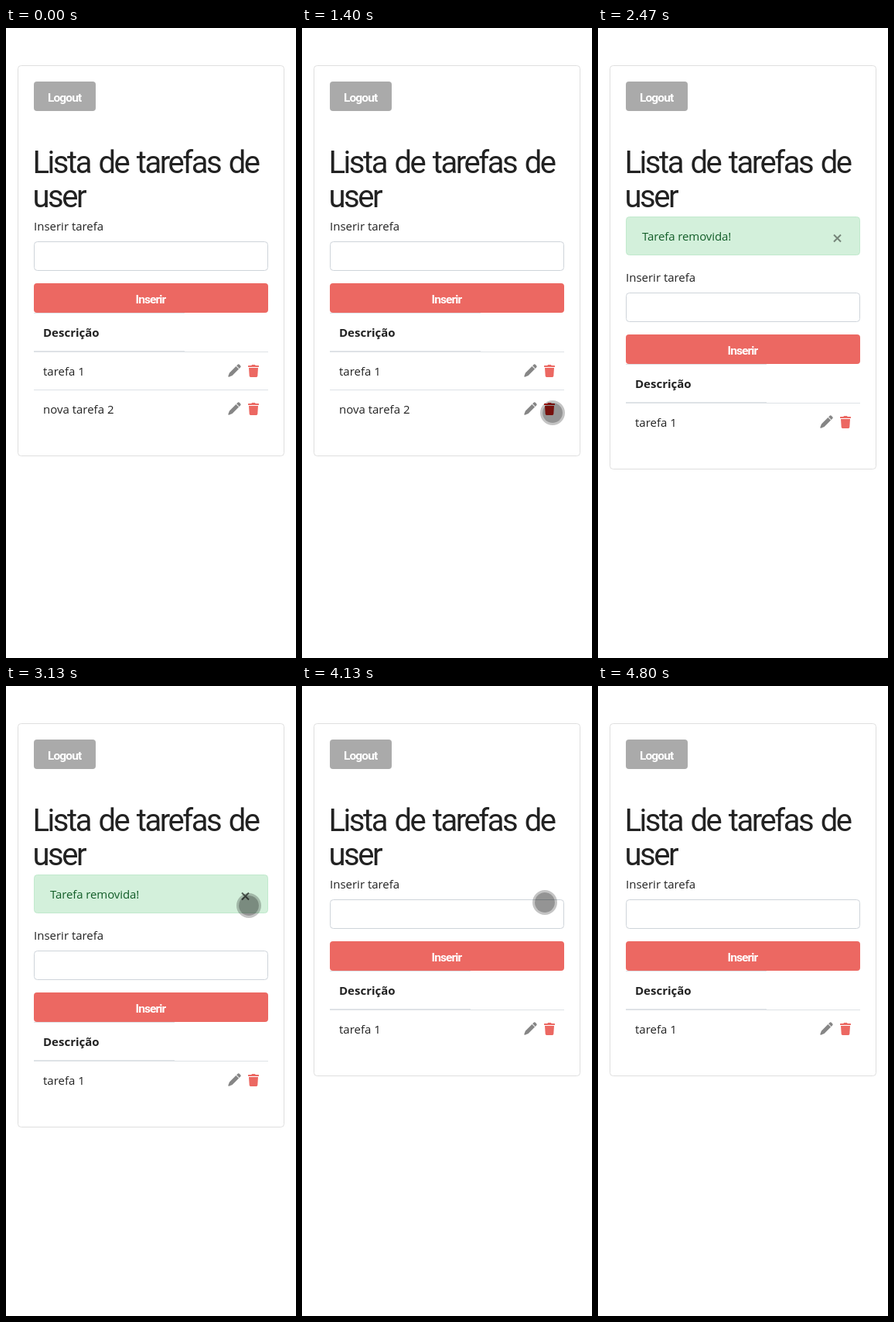
An HTML page that plays this animation: 375x812 px, repeating every 5.27 s.

```html
<!DOCTYPE html>
<html lang="pt">
<head>
<meta charset="utf-8">
<title>Lista de tarefas</title>
<style>
  html, body { margin: 0; width: 100%; height: 100%; overflow: hidden; background: #fff; }
  svg { display: block; width: 375px; height: 812px; }
  text { font: 15px "Open Sans", "Noto Sans", sans-serif; fill: #222; }
  .title { font: 400 40px Roboto, sans-serif; letter-spacing: -2.45px; word-spacing: 3px; }
  .btn { font: 700 15.5px Roboto, sans-serif; letter-spacing: -.9px; fill: #fff; }
  .head { font-weight: 700; }
  .alert { fill: #125d28; letter-spacing: -.1px; }
  .status { font-size: 11.5px; fill: #fff; }
  .line { fill: #dee2e6; }
  .box { fill: none; stroke: #ced4da; }
</style>
</head>
<body>
<svg viewBox="0 0 375 812">
  <defs>
    <g id="pen" transform="rotate(45 8 8)">
      <path d="M5.4-.8Q5.4-2.6 7-2.6H9Q10.6-2.6 10.6-.8V1H5.4ZM5.4 2H10.6V14L8.7 18.2Q8 19 7.3 18.2L5.4 14Z"/>
    </g>
    <g id="bin">
      <rect y="1" width="14" height="2" rx=".5"/>
      <path d="M4 1.2 4.6.4Q4.8 0 5.2 0H8.8Q9.2 0 9.4.4L10 1.2ZM1 4H13L12.3 14.6Q12.2 16 10.8 16H3.2Q1.8 16 1.7 14.6Z"/>
    </g>
  </defs>
  <rect id="card" x="15.5" y="48.5" width="344" rx="4" fill="none" stroke="#dfdfdf"/>
  <rect x="36" y="69" width="80" height="38" rx="4" fill="#aaa"/>
  <text class="btn" x="54" y="95">Logout</text>
  <text class="title" x="34.5" y="187">Lista de tarefas de</text>
  <text class="title" x="34.5" y="231">user</text>

  <g id="alert">
    <rect x="36.5" y="243.5" width="302" height="49" rx="4" fill="#d3f0db" stroke="#c1e9cd"/>
    <text class="alert" x="57" y="274">Tarefa removida!</text>
    <path id="close" d="M305 266.5l9 9m0-9l-9 9" stroke="#000" stroke-width="2"/>
  </g>

  <g id="form">
    <text x="36" y="261">Inserir tarefa</text>
    <rect class="box" x="36.5" y="275.5" width="302" height="37" rx="4"/>
    <rect x="36" y="329" width="303" height="38" rx="4" fill="#ec6862"/>
    <text class="btn" x="167.5" y="355">Inserir</text>
    <rect id="rule1" class="line" x="36" y="367" height="1"/>
    <rect id="rule2" class="line" x="36" y="416" height="2"/>
    <rect class="line" x="36" y="417" width="303" height="1"/>
    <text class="head" x="48" y="398">Descrição</text>
    <text x="48" y="448">tarefa 1</text>
    <use href="#pen" x="287" y="434" fill="#868686"/>
    <use href="#bin" x="313" y="434" fill="#ec6862"/>
    <g id="row2">
      <rect class="line" x="36" y="466" width="303" height="1"/>
      <text x="48" y="497">nova tarefa 2</text>
      <use href="#pen" x="287" y="483" fill="#868686"/>
      <use id="bin2" href="#bin" x="313" y="483"/>
    </g>
  </g>

  <g id="status">
    <path d="M0 791H120q3.5 0 3.5 3.5V812H0Z"/>
    <text class="status" x="5" y="806">Aguardando nelo-b...</text>
  </g>

  <g id="touch">
    <circle r="14.5" fill="none" stroke="#000" stroke-width="3" stroke-opacity=".23"/>
    <circle id="core" r="13"/>
  </g>
</svg>
<script>
const LOOP = 5270, TICK = 200 / 3; // the screen updates 15 times a second
const $ = id => document.getElementById(id);
const set = (id, attrs) => {
  for (const k in attrs) $(id).setAttribute(k, attrs[k]);
};
const clamp = v => Math.min(1, Math.max(0, v));
const ramp = (n, a, b) => clamp((n - a) / (b - a));
const ease = p => p * p * (3 - 2 * p);

// Each visit of the pointer: it enters, drifts on the spot, then leaves.
const visits = [
  { from: 6, to: 29, x: 369, y: 532, moves: [
    { a: 6, b: 9, dx: -47, dy: -27 },
    { a: 11, b: 17, dx: 2, dy: -9 },
    { a: 26, b: 29, dx: 60, dy: 12 }] },
  { from: 40, to: 72, x: 353, y: 369, moves: [
    { a: 40, b: 47, dx: -39, dy: -86 },
    { a: 57, b: 62, dx: 0, dy: -4 },
    { a: 62, b: 71, dx: -241, dy: 507 }] }
];

function pointer(n) {
  const visit = visits.find(v => n >= v.from && n < v.to);
  if (!visit) return null;
  let { x, y } = visit;
  for (const m of visit.moves) {
    const p = ease(ramp(n, m.a, m.b));
    x += m.dx * p;
    y += m.dy * p;
  }
  return [x, y];
}

function draw(ms) {
  const n = Math.floor((ms % LOOP + 3.4) / TICK);
  const between = (a, b) => n >= a && n < b;
  const removed = n >= 27, alerted = between(27, 57);

  const shift = alerted ? 66 : 0, rule = removed ? 182 : 195;
  set("form", { transform: `translate(0 ${shift})` });
  set("card", { height: (removed ? 454 : 503) + shift });
  set("rule1", { width: rule });
  set("rule2", { width: rule });
  set("row2", { opacity: removed ? 0 : 1 });
  set("bin2", { fill: between(14, 27) ? "#cb1c16" : "#ec6862" });

  set("alert", { opacity: alerted ? 1 - ramp(n, 54, 57) : 0 });
  set("close", { "stroke-opacity": between(44, 57) ? .6 : .45 });
  set("status", { opacity: n < 24 ? 0 : 1 - ramp(n, 34, 37) });

  const at = pointer(n);
  set("touch", { opacity: at ? 1 : 0, transform: `translate(${at || [0, 0]})` });
  set("core", { "fill-opacity": n === 20 || between(52, 55) ? .55 : .42 });
}

function frame() {
  draw(performance.now());
  requestAnimationFrame(frame);
}
frame();
</script>
</body>
</html>
```
